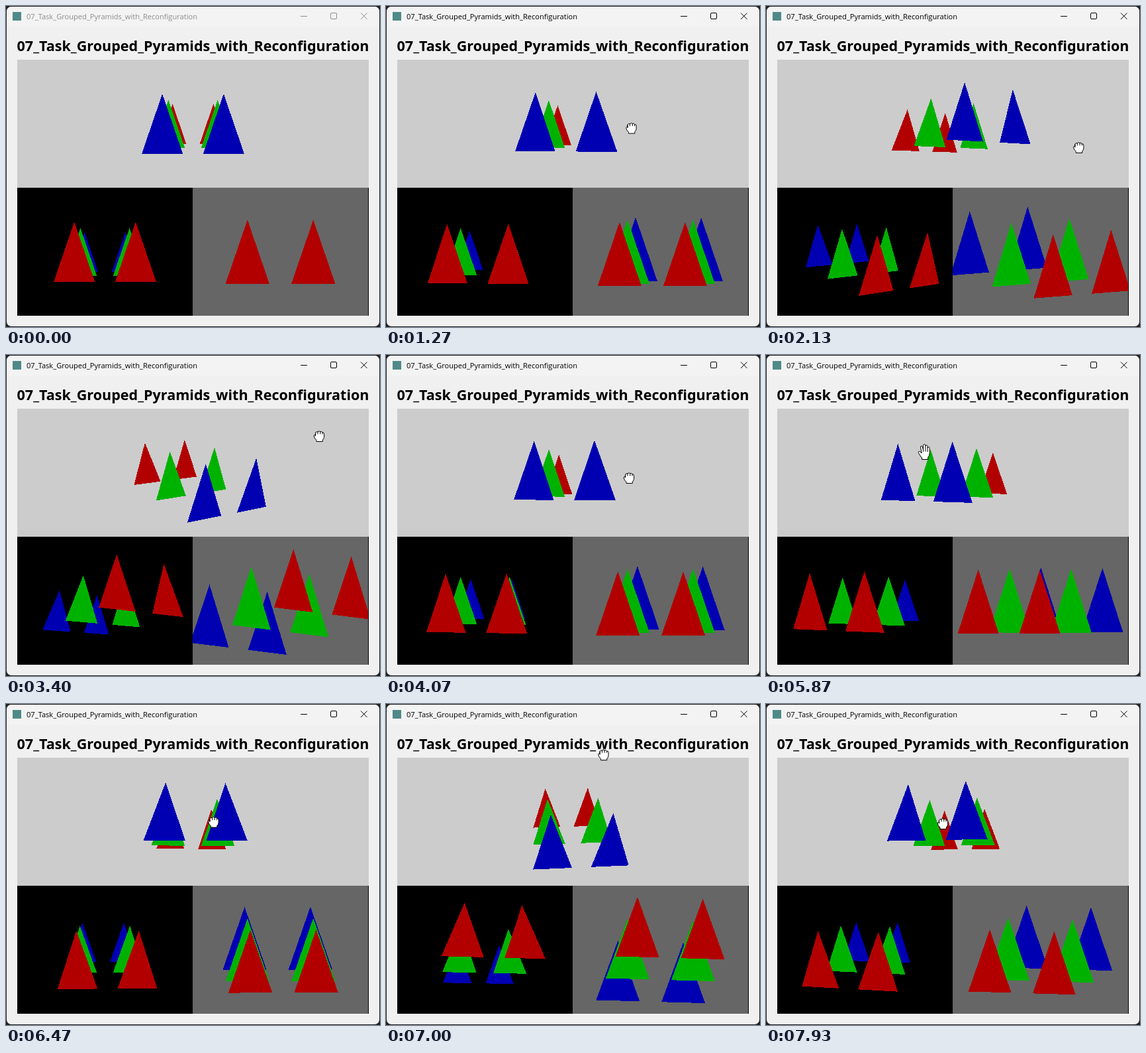
Write an HTML page that moves like this. It is 565 px wide and 484 px high and loops after 8 s.

```html
<!DOCTYPE html>
<html lang="en">
<head>
<meta charset="utf-8">
<title>Pyramid viewports</title>
<style>
  html, body { margin: 0; width: 100%; height: 100%; overflow: hidden; background: #202020; }
  svg { display: block; width: 565px; height: 484px; }
  .bar { font: 11.1px "Open Sans", sans-serif; }
  .head { font: bold 21.55px "Noto Sans", sans-serif; }
  .crisp { shape-rendering: crispEdges; }
</style>
</head>
<body>
<svg viewBox="0 0 565 484" xmlns="http://www.w3.org/2000/svg">
  <defs>
    <clipPath id="win"><rect x="1" y="1" width="563" height="482" rx="7"/></clipPath>
    <clipPath id="c0"><rect x="17" y="81" width="531" height="193"/></clipPath>
    <clipPath id="c1"><rect x="17" y="274" width="265" height="193"/></clipPath>
    <clipPath id="c2"><rect x="282" y="274" width="265" height="193"/></clipPath>
  </defs>
  <g clip-path="url(#win)">
    <rect width="565" height="484" fill="#f0f0f0"/>
    <rect width="565" height="31" fill="#f3f3f3"/>
  </g>
  <rect x="10" y="9" width="13" height="13" fill="#4f8a88"/>
  <g id="bar">
    <text class="bar" x="31" y="20">07_Task_Grouped_Pyramids_with_Reconfiguration</text>
    <path d="M445 15.5h10M492 10.5h6q1.5 0 1.5 1.5v6q0 1.5 -1.5 1.5h-6q-1.5 0 -1.5 -1.5v-6q0 -1.5 1.5 -1.5zM536 10.5l9.5 9.5M545.5 10.5l-9.5 9.5" fill="none" stroke="currentColor"/>
  </g>
  <text class="head" x="16.5" y="68">07_Task_Grouped_Pyramids_with_Reconfiguration</text>
  <g class="crisp">
    <rect x="17" y="81" width="531" height="193" fill="#ccc"/>
    <rect x="17" y="274" width="531" height="193"/>
    <rect x="282" y="274" width="265" height="193" fill="#666"/>
    <g id="scene"></g>
  </g>
  <g id="hand" stroke="#000" stroke-linejoin="round" stroke-linecap="round">
    <g id="fist">
      <path fill="#fff" d="M-5.5 -4.5Q-4.5 -7.2 -2 -6.2Q-.2 -8.2 1.8 -6.3Q4 -7.4 5 -5.3Q7.6 -5.6 7.6 -2.6V1.5Q7.4 4.5 5.3 6V8.5H-4V6.5Q-7.6 3.2 -7.8 0Q-7.6 -2.2 -5.5 -1.6Z"/>
      <path fill="none" d="M-5.5 -4.5V0M-2 -6V-3M1.8 -6V-3M5 -5V-3"/>
    </g>
    <g id="palm">
      <path fill="#fff" d="M-4 1L-5.5 -7Q-5.4 -9.3 -3.6 -8.8Q-2.6 -8.4 -2.2 -6L-1.5 -3V-9.5Q-1.2 -11.6 .3 -11.4Q1.8 -11.2 1.8 -9.2V-8.6Q2.2 -10.6 3.7 -10.2Q5.1 -9.8 5 -7.6V-6Q5.6 -7.8 7 -7.3Q8.3 -6.8 8.2 -4.8V2Q8 6 5.6 8.5V11.5H-3.5V9Q-6 6.5 -8.5 1.8Q-9.3 -.3 -7.8 -.8Q-6.3 -1 -4 1.8Z"/>
      <path fill="none" d="M-1.5 -5V-.5M1.8 -8.5V-.8M5 -6V-.3"/>
    </g>
  </g>
</svg>
<script>
const LOOP = 8000, ENTER = 270, FOCUS = 670;
const get = id => document.getElementById(id);

// pointer moves: begin, end, then where it comes to rest
const moves = [
  [200, 530, 406, 177], [610, 670, 386, 177], [670, 1030, 305, 183],
  [1030, 1390, 393, 184], [1390, 1730, 395, 213], [1850, 2200, 481, 213],
  [2470, 3130, 479, 116], [3330, 3400, 473, 122], [3400, 4070, 367, 185],
  [4210, 4600, 329, 231], [4870, 5130, 323, 180], [5270, 5330, 327, 189],
  [5400, 5870, 239, 146], [5930, 6270, 313, 181], [6400, 7070, 329, 73],
  [7270, 7930, 267, 180]
];

// while the button is down, pointer travel turns the scene (degrees per pixel)
const drags = [
  { from: FOCUS, to: 5270, x: 386.4, y: 177.5, gain: 0.33 },
  { from: 5930, to: LOOP, x: 237.5, y: 146, gain: 0.3 }
];

function pointerAt(t) {
  let x = 570, y = 190;
  for (const [begin, end, toX, toY] of moves) {
    if (t <= begin) break;
    const s = Math.min(1, (t - begin) / (end - begin));
    const e = s * s * (3 - 2 * s);
    x += (toX - x) * e;
    y += (toY - y) * e;
  }
  return { x, y };
}

function turnAt(t) {
  let yaw = 0, pitch = 0;
  for (const d of drags) {
    if (t < d.from) break;
    const p = pointerAt(Math.min(t, d.to));
    yaw += (p.x - d.x) * d.gain;
    pitch += (d.y - p.y) * d.gain;
  }
  return [yaw, pitch].map(deg => deg * Math.PI / 180);
}

const EYE = 20;
const zoom = 1 / Math.tan(Math.PI / 12);
const views = [
  { x: 282.5, y: 177.5, side: 1, persp: true },
  { x: 149.5, y: 370.5, side: -1, persp: true },
  { x: 414.5, y: 370.5, side: -1, persp: false }
];
const rows = [[-4, "#b20000"], [0, "#00b200"], [4, "#0000b2"]];

function make(tag, attrs, parent) {
  const el = document.createElementNS("http://www.w3.org/2000/svg", tag);
  for (const n in attrs) el.setAttribute(n, attrs[n]);
  return parent.appendChild(el);
}

// back rows first, so nearer rows cover them
const shapes = [];
views.forEach((view, n) => {
  const g = make("g", { "clip-path": `url(#c${n})` }, get("scene"));
  const order = view.side > 0 ? rows : [...rows].reverse();
  for (const [z, fill] of order)
    for (const x of [-1.5, 1.5])
      shapes.push({ view, x, z, el: make("polygon", { fill }, g) });
});

function project(view, x, y, z, yaw, pitch) {
  const cy = Math.cos(yaw), sy = Math.sin(yaw), cp = Math.cos(pitch), sp = Math.sin(pitch);
  const x1 = x * cy + z * sy, z1 = z * cy - x * sy;
  const y1 = y * cp - z1 * sp, z2 = y * sp + z1 * cp;
  const k = view.persp ? zoom / (EYE - view.side * z2) : 1 / 4;
  return [view.x + view.side * x1 * k * 132.6, view.y - y1 * k * 96.5]
    .map(v => v.toFixed(2)).join();
}

function draw(t) {
  const [yaw, pitch] = turnAt(t);
  for (const { view, x, z, el } of shapes) {
    const pts = [[0, 2], [-1, -2], [1, -2]]
      .map(([dx, y]) => project(view, x + dx, y, z, yaw, pitch));
    el.setAttribute("points", pts.join(" "));
  }

  const tone = t < FOCUS ? "#8c8c8c" : "#000";
  get("bar").setAttribute("fill", tone);
  get("bar").setAttribute("color", tone);

  const p = pointerAt(t);
  const held = drags.some(d => t >= d.from && t <= d.to);
  get("hand").setAttribute("transform", `translate(${p.x.toFixed(1)} ${p.y.toFixed(1)})`);
  get("hand").setAttribute("visibility", t < ENTER ? "hidden" : "visible");
  get("fist").setAttribute("display", held ? "inline" : "none");
  get("palm").setAttribute("display", held ? "none" : "inline");
}

const start = performance.now();
function tick() {
  draw((performance.now() - start) % LOOP);
  requestAnimationFrame(tick);
}
draw(0);
requestAnimationFrame(tick);
</script>
</body>
</html>
```
